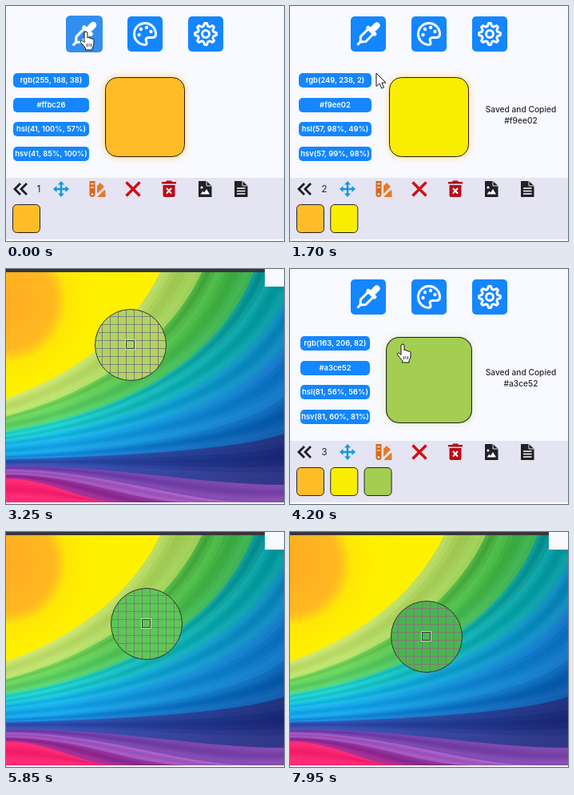
These frames come from a looping animation (348x294 px, 8 s). An HTML page with a canvas:

```html
<!DOCTYPE html>
<html lang="en">
<head>
<meta charset="utf-8">
<title>Color picker</title>
<style>
  html, body { margin: 0; width: 100%; height: 100%; overflow: hidden; background: #fff; }
  canvas, svg { position: absolute; left: 0; top: 0; width: 348px; height: 294px; }
  text { font-family: Inter, "Open Sans", sans-serif; text-anchor: middle; }
  .pill text { font-size: 9.4px; font-weight: 600; fill: #fff; }
  .toast { font-size: 10.2px; font-weight: 500; fill: #26262c; }
  .line { fill: none; stroke: #fff; stroke-width: 3; stroke-linejoin: round; stroke-linecap: round; }
</style>
</head>
<body>
<canvas id="photo" width="348" height="294"></canvas>
<svg viewBox="0 0 348 294">
  <g id="app">
    <rect width="348" height="215" fill="#f9faff"/>
    <rect y="215" width="348" height="77" fill="#e5e4f2"/>

    <g id="dropper">
      <rect id="dropperBox" x="76" y="13" width="44" height="44" rx="5" fill="#1486ff"/>
      <g transform="translate(98 35) rotate(45)" fill="#fff">
        <rect x="-4" y="-19" width="8" height="13" rx="4"/>
        <rect x="-8" y="-8" width="16" height="5" rx="2"/>
        <path class="line" d="M-4.5-3V9L0 14L4.5 9V-3M0 14V18"/>
      </g>
    </g>
    <rect x="152" y="13" width="44" height="44" rx="5" fill="#1486ff"/>
    <g transform="translate(174 35)" fill="#fff">
      <path class="line" d="M0 13.5A13.5 13.5 0 1 1 13.5 0Q13.5 4.5 9 4.5H4.5Q0 4.5 1.5 9Q3 13.5 0 13.5Z"/>
      <circle cx="-7.5" cy="1" r="2.2"/><circle cx="-5" cy="-6" r="2.2"/>
      <circle cx="2" cy="-8" r="2.2"/><circle cx="7.5" cy="-3" r="2.2"/>
    </g>
    <rect x="228" y="13" width="44" height="44" rx="5" fill="#1486ff"/>
    <g transform="translate(250 35)">
      <path id="gear" class="line"/>
      <circle r="4.5" class="line"/>
    </g>

    <g id="pills"></g>
    <g id="swatch">
      <rect id="swatchBox" x="124.5" y="89.5" width="99" height="99" rx="15" stroke="#222"/>
    </g>
    <g id="toast" class="toast">
      <text x="289" y="133">Saved and Copied</text>
      <text id="toastHex" x="289" y="147"></text>
    </g>

    <path d="M18 222L11 229L18 236M26 222L19 229L26 236" fill="none" stroke="#1d1d22" stroke-width="2.8"/>
    <text id="count" y="233" font-size="12" fill="#26262c"></text>
    <g id="tools">
      <g transform="translate(72 229)" fill="#1495e6">
        <path d="M-7 0H7M0-7V7" stroke="#1495e6" stroke-width="2.4"/>
        <path d="M0-10L4-5.5H-4ZM0 10L4 5.5H-4ZM-10 0L-5.5-4V4ZM10 0L5.5-4V4Z"/>
      </g>
      <g transform="translate(117 229)" fill="#e87a26">
        <path d="M0-4L4-8L9-3L0 6ZM3 7L9 1.5H10.5V10H0Z"/>
        <path d="M-9.5-10H-2.5V6.5A3.5 3.5 0 0 1-9.5 6.5Z" fill="#d8691c"/>
        <path d="M-8-6.5H-4M-8-2H-4" stroke="#f7d9bd" stroke-width="1.5"/>
        <circle cx="-6" cy="6.5" r="1.3" fill="#fff"/>
      </g>
      <path d="M153.5 220.5L170.5 237.5M170.5 220.5L153.5 237.5" stroke="#d20d12" stroke-width="3.4"/>
      <g transform="translate(207 229)">
        <path d="M-9-9H-4L-3-10.5H3L4-9H9V-6.5H-9ZM-7.5-5H7.5V8Q7.5 10 5.5 10H-5.5Q-7.5 10-7.5 8Z" fill="#b90d16"/>
        <path d="M-3-1L3 5.5M3-1L-3 5.5" stroke="#fff" stroke-width="2"/>
      </g>
      <g transform="translate(252 229)">
        <path d="M-8-10H2L8.5-4V10H-8Z" fill="#212126"/>
        <path d="M2-10V-4H8.5" fill="none" stroke="#e5e4f2"/>
        <path d="M-5.5 6.5L-2.5 2.5L-1 4.5L2 0L6 6.5Z" fill="#fff"/>
        <circle cx="-4" cy="-2" r="1.6" fill="#fff"/>
      </g>
      <g transform="translate(297 229)">
        <path d="M-8-10H2L8.5-4V10H-8Z" fill="#212126"/>
        <path d="M2-10V-4H8.5" fill="none" stroke="#e5e4f2"/>
        <path d="M-5-1H5.5M-5 2.5H5.5M-5 6H5.5" stroke="#fff" stroke-width="1.4"/>
      </g>
    </g>
    <g id="saved"></g>

    <path id="arrow" d="M0 0V16.5L4 13L6.8 19L9.5 17.8L6.8 12H12Z" fill="#fff" stroke="#111"/>
    <g id="hand" stroke="#111" fill="#fff" stroke-linejoin="round">
      <path d="M-2 2A2 2 0 0 1 2 2V8A1.6 1.6 0 0 1 5 8.8A1.5 1.5 0 0 1 7.6 9.5A1.4 1.4 0 0 1 10 10.5V15Q10 18 8 20.5V23H-.5V20.5L-6.5 13.5Q-7.5 11.5-5.5 11Q-4 11-2 13.5Z"/>
      <path d="M1.5 15V19M4 15V19M6.5 15V19" stroke-width=".8"/>
    </g>
  </g>

  <g id="loupe">
    <circle id="lens" r="44.5"/>
    <path id="grid" fill="none" stroke="#85707c" stroke-opacity=".85"/>
    <circle r="44.5" fill="none" stroke="#33352c"/>
    <rect x="-6.5" y="-6.5" width="12" height="12" fill="none" stroke="#f4f0d8" stroke-opacity=".7"/>
    <rect x="-5.5" y="-5.5" width="10" height="10" fill="none" stroke="#34364a"/>
  </g>
</svg>
<script>
const LOOP = 8000;
const BUTTON = [76, 13, 44], SWATCH = [124, 89, 100];   // x, y, size
const DROPPER = [100, 32];
const $ = id => document.getElementById(id);
const show = (id, on) => { $(id).style.display = on ? '' : 'none'; };
const lerp = (a, b, k) => a + (b - a) * k;
const mix = (a, b, k) => a.map((v, i) => lerp(v, b[i], k));
const clamp = k => Math.min(1, Math.max(0, k));
const ease = k => k * k * (3 - 2 * k);
const rgb = hex => [1, 3, 5].map(i => parseInt(hex.slice(i, i + 2), 16));

// Each ribbon starts at a point and flows to the left edge.
const ribbons = [
  { start: [193, 4], end: 162, left: '#c6e06c', right: '#98c64c' },
  { start: [245, 4], end: 184, left: '#6fd058', right: '#2f9630' },
  { start: [262, 4], end: 190, left: '#62cf5c', right: '#3eab38' },
  { start: [310, 4], end: 203, left: '#20d0c6', right: '#058a8c' },
  { start: [330, 4], end: 209, left: '#1cc8cc', right: '#069a9c' },
  { start: [348, 40], end: 215, left: '#16b8e2', right: '#0d88ba' },
  { start: [348, 95], end: 222, left: '#16a8e8', right: '#1276c4' },
  { start: [348, 160], end: 233, left: '#1494e0', right: '#0a62b2' },
  { start: [348, 206], end: 238, left: '#2a50b0', right: '#1a2c78' },
  { start: [348, 270], end: 246, left: '#6a3ca8', right: '#7a44a8' },
  { start: [310, 292], end: 251, left: '#a058c0', right: '#a862c4' },
  { start: [230, 292], end: 257, left: '#8c2a94', right: '#84349c' },
  { start: [140, 292], end: 262, left: '#f8246f', right: '#d8228c' }
];
function flow({ start: [x, y], end }, i) {
  if (y > end) return [x, y, x * .7, y, x * .4, end, 0, end];
  const bend = Math.min(.06, i * .02);
  return [x, y, x * (.8 + bend), lerp(y, end, .5 + bend), x * (.42 + bend), lerp(y, end, .82 + bend), 0, end];
}

const ctx = $('photo').getContext('2d', { willReadFrequently: true });

function drawPhoto() {
  const glow = ctx.createRadialGradient(0, 40, 5, 0, 40, 175);
  [[0, '#ffad22'], [.32, '#ffb820'], [.37, '#ffcb18'], [.42, '#ffe606'], [.6, '#fff000'], [1, '#fff200']]
    .forEach(([at, color]) => glow.addColorStop(at, color));
  ctx.fillStyle = glow;
  ctx.fillRect(0, 0, 348, 292);

  const STEPS = 8;
  ribbons.forEach((ribbon, i) => {
    const next = ribbons[i + 1] || { ...ribbon, end: ribbon.end + 28 };
    for (let s = 0; s < STEPS; s++) {
      const k = s / STEPS, light = 8 * Math.cos(k * 8);
      const [ax, ay, ...rest] = mix(flow(ribbon, i), flow(next, i + 1), k);
      const tone = side => `rgb(${mix(rgb(ribbon[side]), rgb(next[side]), k * .2).map(v => v + light)})`;
      const fill = ctx.createLinearGradient(60, 0, 340, 0);
      fill.addColorStop(0, tone('left'));
      fill.addColorStop(1, tone('right'));
      ctx.fillStyle = fill;
      ctx.beginPath();
      ctx.moveTo(ax, ay);
      ctx.bezierCurveTo(...rest);
      ctx.lineTo(0, 294);
      ctx.lineTo(348, 294);
      ctx.lineTo(348, ay);
      ctx.fill();
    }
  });
  ctx.fillStyle = '#38363b';
  ctx.fillRect(0, 0, 348, 4);
  ctx.fillStyle = '#f9faff';
  ctx.fillRect(324, 0, 24, 22);
  ctx.fillStyle = '#fff';
  ctx.fillRect(0, 292, 348, 2);
}

// App screens, each opened by picking a colour; the photo fills the gaps.
// bow is how far the pointer strays from the straight way to the pick.
const screens = [
  { from: 0, to: 150, hex: '#ffbc26', glow: '#ffcf70', pill: 95, pick: DROPPER, bow: [0, 0] },
  { from: 1500, to: 2300, hex: '#f9ee02', glow: '#ffd884', pill: 91, pick: [108, 84], bow: [-12, -30] },
  { from: 4050, to: 4850, hex: '#a3ce52', glow: '#a3ce5255', pill: 87, pick: [141, 94], bow: [30, 19] },
  { from: 6600, to: 7500, hex: '#53be4f', glow: '#53be4f66', pill: 93, pick: [189, 125], bow: [6, 11] },
  { from: LOOP, pick: [171, 131], bow: [0, 0] }
];

function pointer(time) {
  const t = Math.max(0, time);
  const i = screens.findLastIndex(s => t >= s.from);
  const here = screens[i], next = screens[i + 1];
  if (t < here.to) return mix(here.pick, DROPPER, ease(clamp((t - here.from - 200) / 300)));
  const k = clamp((t - here.to) / (next.from - here.to) / .8);
  return mix(DROPPER, next.pick, ease(k)).map((v, axis) => v + next.bow[axis] * Math.sin(Math.PI * k));
}

function labels(hex) {
  const [r, g, b] = rgb(hex), max = Math.max(r, g, b), min = Math.min(r, g, b), range = max - min;
  const sector = max === r ? (g - b) / range : max === g ? 2 + (b - r) / range : 4 + (r - g) / range;
  const hue = Math.round(60 * (sector + 6)) % 360;
  const percent = v => `${Math.round(v * 100)}%`;
  const light = max + min;
  return [
    `rgb(${r}, ${g}, ${b})`,
    hex,
    `hsl(${hue}, ${percent(range / (255 - Math.abs(light - 255)))}, ${percent(light / 510)})`,
    `hsv(${hue}, ${percent(range / max)}, ${percent(max / 255)})`
  ];
}

const inside = ([px, py], [x, y, size]) => px >= x && px <= x + size && py >= y && py <= y + size;
// Averaging recent hover states gives a short scale transition.
const hoverAmount = (t, box) =>
  [0, 50, 100, 150].reduce((sum, lag) => sum + inside(pointer(t - lag), box) / 4, 0);
const scaleAbout = (x, y, s) => `translate(${x} ${y}) scale(${s}) translate(${-x} ${-y})`;

function build() {
  drawPhoto();
  const teeth = [];
  for (let i = 0; i < 32; i++) {
    const r = (i + 1) % 4 < 2 ? 13.5 : 10, a = (i + .5) * Math.PI / 16;
    teeth.push(`${(r * Math.sin(a)).toFixed(2)} ${(-r * Math.cos(a)).toFixed(2)}`);
  }
  $('gear').setAttribute('d', `M${teeth.join('L')}Z`);

  let grid = '';
  for (let p = -35.5; p < 40; p += 10) {
    const h = Math.sqrt(44 ** 2 - p * p);
    grid += `M${p} ${-h}V${h}M${-h} ${p}H${h}`;
  }
  $('grid').setAttribute('d', grid);
}

let shown = null;
function fillScreen(screen) {
  if (shown === screen) return;
  shown = screen;
  const n = screens.indexOf(screen) + 1;
  $('pills').innerHTML = labels(screen.hex).map((label, i) => {
    const y = Math.round(84 + i * 30.7);
    return `<g class="pill"><rect x="${56.5 - screen.pill / 2}" y="${y}" width="${screen.pill}" height="18" rx="5" fill="#1486ff"/>
      <text x="56.5" y="${y + 12.3}">${label}</text></g>`;
  }).join('');
  $('saved').innerHTML = screens.slice(0, n).map((s, i) =>
    `<rect x="${8.5 + i * 42.3}" y="248.5" width="34" height="35" rx="5" fill="${s.hex}" stroke="#222"/>`).join('');
  $('swatchBox').setAttribute('fill', screen.hex);
  $('swatchBox').style.filter = `drop-shadow(0 0 5px ${screen.glow})`;
  $('toastHex').textContent = screen.hex;
  show('toast', n > 1);
  $('count').textContent = n;
  $('count').setAttribute('x', n > 1 ? 43 : 41);
  $('tools').setAttribute('transform', `translate(${n > 1 ? 0 : -3} 0)`);
}

function render(t) {
  const at = pointer(t), [x, y] = at;
  const screen = screens.find(s => t >= s.from && t < s.to);
  show('app', screen);
  show('loupe', !screen);
  if (screen) {
    fillScreen(screen);
    const onDropper = hoverAmount(t, BUTTON);
    $('dropper').setAttribute('transform', scaleAbout(98, 35, 1 + .045 * onDropper));
    $('dropperBox').setAttribute('fill', `rgb(${mix([20, 134, 255], [50, 143, 240], onDropper)})`);
    $('swatch').setAttribute('transform', scaleAbout(174, 139, 1 + .08 * hoverAmount(t, SWATCH)));
    const pointing = inside(at, BUTTON) || inside(at, SWATCH);
    show('hand', pointing);
    show('arrow', !pointing);
    for (const id of ['hand', 'arrow']) $(id).setAttribute('transform', `translate(${x} ${y})`);
  } else {
    const px = Math.round(x), py = Math.round(y);
    const [r, g, b] = ctx.getImageData(px, py, 1, 1).data;
    $('lens').setAttribute('fill', `rgb(${r},${g},${b})`);
    $('loupe').setAttribute('transform', `translate(${px} ${py})`);
  }
}

build();
const start = performance.now();
function tick() {
  render((performance.now() - start) % LOOP);
  requestAnimationFrame(tick);
}
tick();
</script>
</body>
</html>
```
